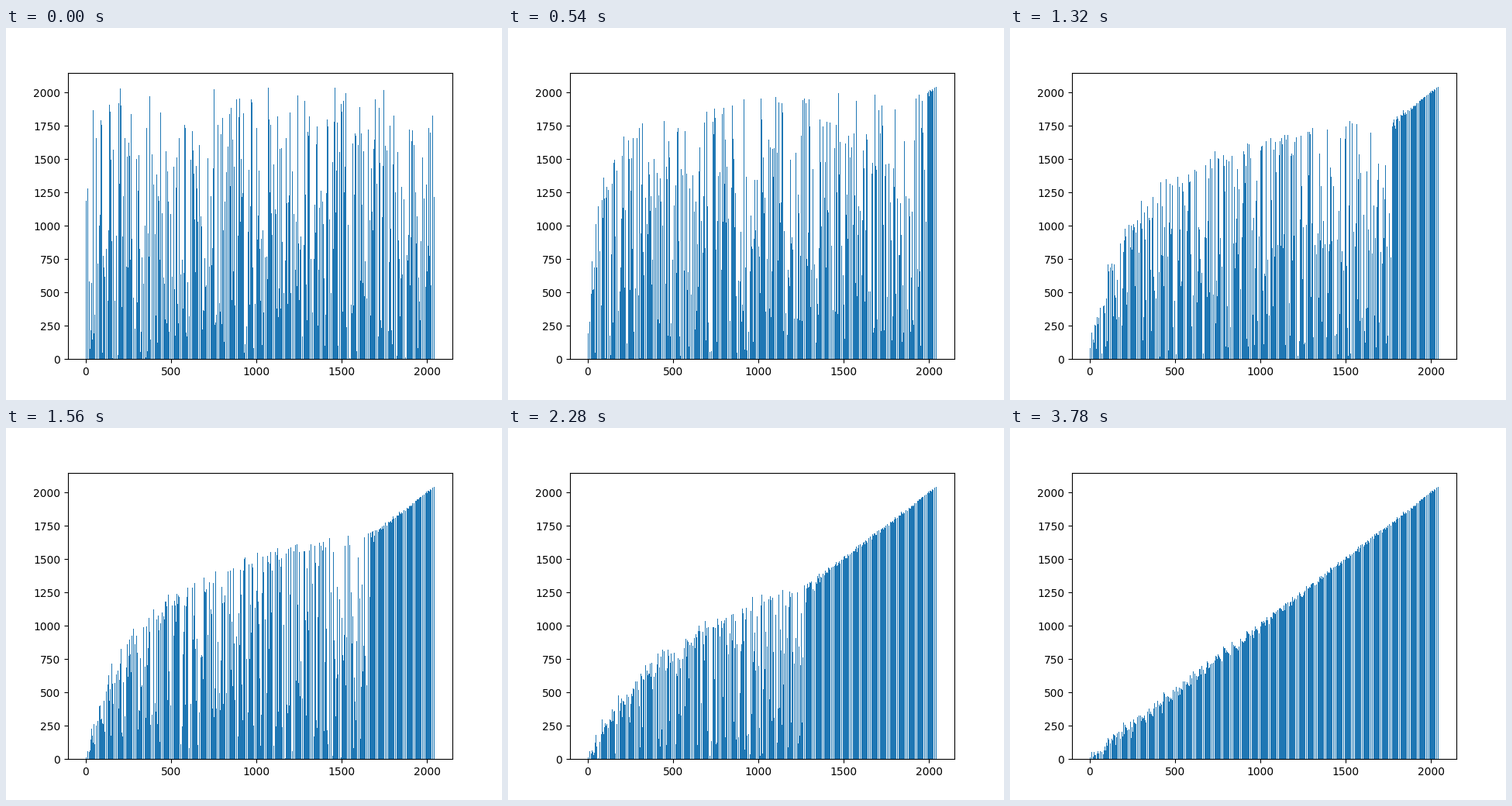
Write a matplotlib script that moves like this. It is 640x480 px and loops after 3840 ms.

```python
import numpy as np
import matplotlib.pyplot as plt
from matplotlib.animation import FuncAnimation
from matplotlib.collections import PolyCollection

COUNT = 2048
PASSES = 64
INTERVAL = 60
BAR_WIDTH = 0.8
MARGIN = 0.05


def gap_pass(values, gap):
    """One bubble pass that compares items a fixed gap apart."""
    values = values[:]
    for i in range(len(values) - gap):
        j = i + gap
        if values[i] > values[j]:
            values[i], values[j] = values[j], values[i]
    return values


def sort_states():
    """Array after each pass, with the gap growing by one every time."""
    values = np.random.RandomState(0).permutation(COUNT).tolist()
    states = []
    for gap in range(1, PASSES + 1):
        values = gap_pass(values, gap)
        states.append(values)
    return states


def bar_corners(heights):
    left = np.arange(COUNT) - BAR_WIDTH / 2
    right = left + BAR_WIDTH
    base = np.zeros(COUNT)
    x = np.column_stack([left, right, right, left])
    y = np.column_stack([base, base, heights, heights])
    return np.stack([x, y], axis=2)


states = sort_states()

fig, ax = plt.subplots(figsize=(6.4, 4.8), dpi=100)
first, last = -BAR_WIDTH / 2, COUNT - 1 + BAR_WIDTH / 2
pad = MARGIN * (last - first)
ax.set_xlim(first - pad, last + pad)
ax.set_ylim(0, (COUNT - 1) * (1 + MARGIN))

bars = PolyCollection(bar_corners(states[0]), facecolors="C0",
                      edgecolors="none", linewidths=0)
ax.add_collection(bars, autolim=False)


def update(step):
    bars.set_verts(bar_corners(states[step]))
    return (bars,)


anim = FuncAnimation(fig, update, frames=PASSES, interval=INTERVAL,
                     repeat=True, repeat_delay=0, blit=False)
plt.show()
```
